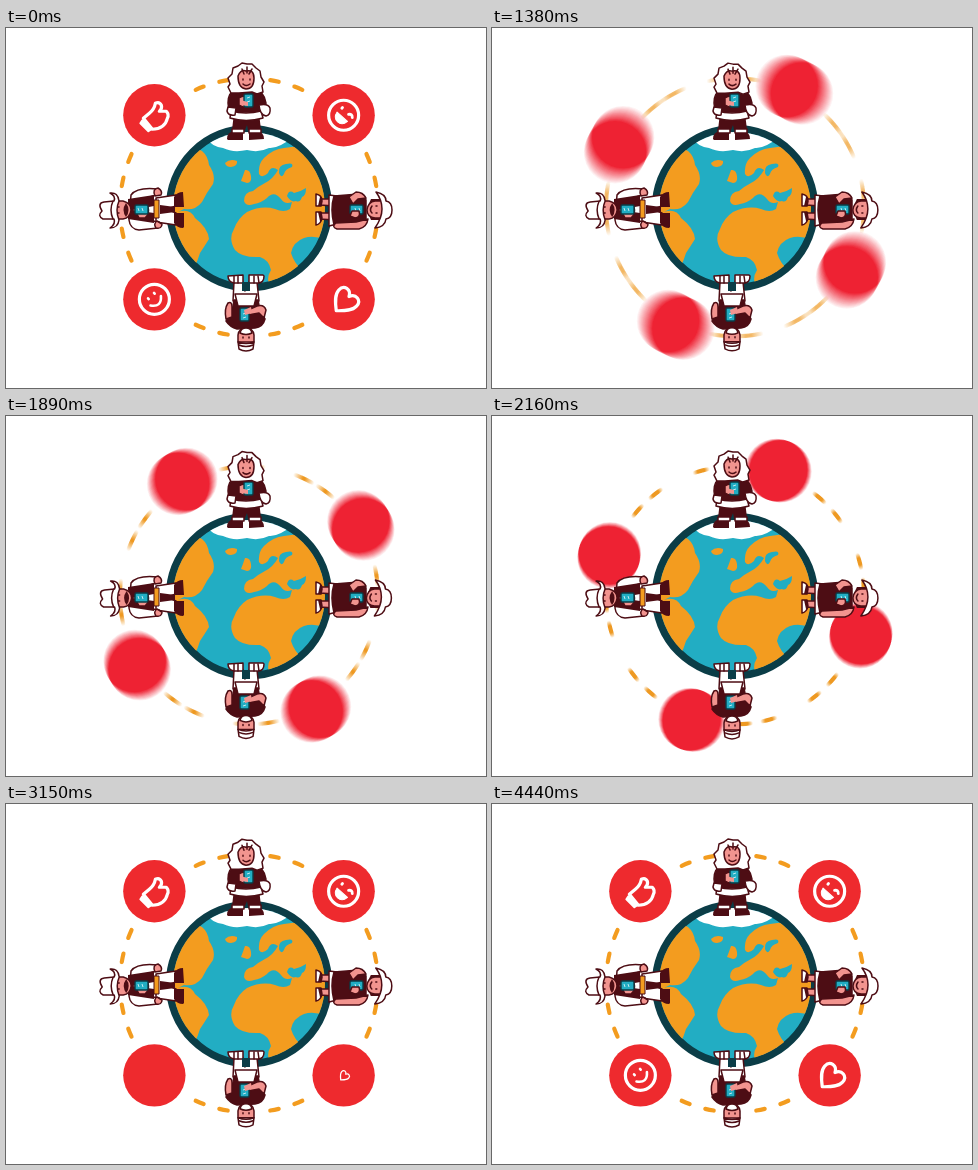
Recreate the animation shown at these times as an HTML page with a canvas. Size 480 by 360 pixels, loop 4500 ms.

```html
<!DOCTYPE html>
<html lang="en">
<head>
<meta charset="utf-8">
<title>Connected globe</title>
<style>
  html, body { margin: 0; width: 100%; height: 100%; overflow: hidden; background: #fff; }
  #stage { position: relative; width: 480px; height: 360px; overflow: hidden; }
  canvas, svg { position: absolute; left: 0; top: 0; width: 480px; height: 360px; }
  .ln { stroke: #4d0d14; stroke-width: 1.5; stroke-linejoin: round; stroke-linecap: round; }
  .w { fill: #fff; }
  .m { fill: #4d0d14; }
  .s { fill: #f2948f; }
  .n { fill: none; }
  .icon { fill: none; stroke: #fff; stroke-width: 3.2; stroke-linecap: round; stroke-linejoin: round; }
  .solid { fill: #fff; }
</style>
</head>
<body>
<div id="stage">
  <canvas id="dashes" width="480" height="360"></canvas>
  <canvas id="discs" width="480" height="360"></canvas>
  <svg viewBox="0 0 480 360">
    <defs>
      <clipPath id="sea"><circle cx="243" cy="180" r="76"/></clipPath>
      <g id="phone">
        <rect x="-4" y="-6" width="9" height="13" rx="1.5" fill="#22adc3" stroke="#0b3d47" stroke-width="1.4"/>
        <path d="M-1-2L2-3M-1 2L2 1" stroke="#bfeaf0" stroke-width="1"/>
      </g>
    </defs>

    <g id="icons">
      <g class="icon">
        <path d="M-11 3L-5-2Q0-6 1-12Q5-14 7-10Q8-7 5-4L12-4Q15-1 13 3Q12 8 8 11Q4 14-2 14Z"/>
        <path class="solid" d="M-12 5L-3 14L-6 16L-14 8Z" stroke-width="2"/>
      </g>
      <g class="icon">
        <circle r="15"/>
        <g transform="rotate(42)">
          <path class="solid" d="M-7 2H7Q6 9 0 9Q-6 9-7 2Z" stroke-width="1"/>
          <path d="M-6-5V-4M3-4Q5.500-7 8-4" stroke-width="2.800"/>
        </g>
      </g>
      <g class="icon">
        <path transform="translate(2 1) rotate(42)" d="M0 14C-7 8-12 3-12-3C-12-11-3-12 0-5C3-12 12-11 12-3C12 3 7 8 0 14Z"/>
      </g>
      <g class="icon">
        <circle r="15"/>
        <g transform="rotate(-42)" stroke-width="2.600">
          <path d="M-7 2Q0 11 7 2M-4-5V-4M4-5V-4"/>
        </g>
      </g>
    </g>

    <circle cx="243" cy="180" r="79.500" fill="#22adc3" stroke="#0b3d47" stroke-width="7.500"/>
    <g clip-path="url(#sea)" fill="#f39c1f">
      <path d="M160 145L176 128Q190 119 196 123Q202 128 203 137Q210 147 207 156Q201 164 196 174Q189 183 178 181L172 184Q184 180 189 190Q202 200 203 211Q198 219 194 225Q192 232 188 240L160 220Z"/>
      <path d="M219 135Q224 130 231 133Q232 138 225 139Q220 139 219 135Z"/>
      <path d="M235 153Q237 148 239 142Q244 141 245 148Q246 155 241 155Z"/>
      <path d="M253 146Q252 136 258 130Q267 121 278 120L293 118L325 150V214Q309 206 298 210Q287 214 285 225Q288 235 297 243L268 264Q258 253 265 242Q263 232 254 229Q236 230 229 222Q222 211 228 201Q232 190 241 184Q256 177 269 181Q278 185 284 181L286 174Q279 177 275 171Q268 162 261 170Q255 175 248 176Q240 179 238 173Q238 164 247 163Q253 158 259 155Q267 151 272 142Q265 137 262 145Q256 151 253 146Z"/>
    </g>
    <g clip-path="url(#sea)">
      <path fill="#22adc3" d="M273 145Q272 137 280 136Q288 134 286 139Q279 141 278 146Q275 151 273 145ZM281 168Q283 161 288 165Q294 164 300 160Q300 168 296 169Q294 175 290 173Q285 175 281 168Z"/>
      <path class="w" d="M198 108Q206 119 217 120Q227 125 241 122Q253 125 263 120Q272 121 289 108L260 96H220Z"/>
    </g>

    <!-- fur coat -->
    <g transform="translate(240 111)">
      <path class="m" d="M-12-26H13L15-9H2L1-14L-1-9H-14Z"/>
      <path class="m" d="M-19 0Q-19-7-12-8H-3V1H-18ZM3 1V-8H11Q18-7 18 0Z"/>
      <path class="w ln" d="M-14-10H-2V-6H-14ZM3-10H15V-6H3Z"/>
      <path class="m ln" d="M-10-49Q-18-47-18-36L-17-27H18L20-36Q18-48 9-49Z"/>
      <path class="w ln" d="M-15-28Q0-24 15-28L17-21Q0-16-16-21Z"/>
      <path class="w ln" d="M13-34Q22-36 24-31Q25-24 20-23Q14-24 13-34ZM-18-32L-10-31L-11-24Q-18-23-19-28Z"/>
      <path class="s ln" stroke-width="1" d="M-7-41Q-1-45 3-41L5-33Q-1-30-7-34Z"/>
      <use href="#phone" x="2" y="-39"/>
      <path class="s" d="M-6-39L2-37V-33L-5-34Z"/>
      <g class="head">
        <path class="w ln" d="M-15-46L-18-52L-16-55L-18-61L-14-65L-13-71L-8-73L-4-76L1-75L6-75L10-71L14-68L15-62L18-57L16-53L17-47L11-45L6-47L-7-46Z"/>
        <path class="s ln" d="M-8-63Q-5-70 0-68Q8-70 8-61Q8-50 0-50Q-8-51-8-63Z"/>
        <path class="ln n" d="M-4-70L-2-65M1-72V-66M6-70L3-65M-3-55Q0-52 4-55"/>
        <path class="eyes ln n" d="M-3-60V-59M4-60V-59"/>
      </g>
    </g>

    <!-- wide brim -->
    <g transform="translate(177 182) rotate(-90)">
      <path class="w ln" d="M-12-27H12L15-7H4L1-17L-3-7H-15Z"/>
      <path class="m" d="M-18 0Q-18-6-13-9H-3V1H-17ZM3 1V-9H13Q18-6 18 0Z"/>
      <path class="m" d="M-4-23H5L3-8H-2Z"/>
      <path class="w ln" d="M-10-54Q-19-53-20-44L-18-25L-12-24L-10-36L12-36L16-24L21-26Q23-46 15-52Z"/>
      <path class="m" d="M-9-55L-13-29H-3L0-50L4-29H15L11-55Z"/>
      <path d="M-8-29H10V-24H-8Z" fill="#f39c1f" stroke="#4d0d14"/>
      <path class="s ln" d="M-18-27Q-14-30-11-26L-14-21Q-19-21-18-27ZM14-28Q21-31 22-25Q19-20 15-22ZM-8-44Q-1-49 4-44L3-35Q-4-33-8-38Z"/>
      <use href="#phone" x="0" y="-42"/>
      <g class="head">
        <path class="s ln" d="M-9-68H9V-60Q7-52 0-52Q-8-53-9-60Z"/>
        <path class="m" d="M-7-57Q0-62 7-57Q0-52-7-57Z"/>
        <path id="wink" class="eyes ln n" d="M-3-65V-64M3-65V-64"/>
        <path class="w ln" d="M-18-73Q-14-67-9-69L-9-80Q-6-86-1-81Q7-86 8-79L9-69Q14-67 17-73Q18-65 9-64Q0-68-10-64Q-18-65-18-73Z"/>
        <path class="ln n" d="M-9-70Q0-74 9-70"/>
      </g>
    </g>

    <!-- sun hat -->
    <g transform="translate(311 181) rotate(90)">
      <path class="s ln" d="M-10-19H-3L-4-2H-10ZM4-19H11L10-2H4Z"/>
      <path class="w ln" d="M-15 1Q-14-5-8-5L-3-4V1ZM3 1V-4L9-5Q15-4 16 1Z"/>
      <path class="m" d="M-3-1V-5H-12V-3ZM3-1V-5H12V-3Z"/>
      <path class="w ln" d="M-13-20H15L17-12H-14Z"/>
      <path class="m ln" d="M-9-49Q-15-48-15-42L-13-17Q0-13 16-17L13-49Z"/>
      <path class="s ln" d="M10-51Q18-50 20-42L20-20Q18-14 14-19L13-39ZM-11-49Q-17-46-17-39L-12-32L-5-36L-10-41Z"/>
      <use href="#phone" x="0" y="-40"/>
      <path class="s ln" d="M2-42Q8-44 9-38L7-33L2-35Z"/>
      <g class="head">
        <path class="m" d="M-10-69H11V-54Q0-48-10-54Z"/>
        <path class="s ln" d="M-8-66H9V-58Q8-50 1-50Q-7-51-8-58Z"/>
        <path class="ln n" d="M-3-55Q1-52 4-55"/>
        <path class="eyes ln n" d="M-3-60V-59M4-60V-59"/>
        <path class="w ln" d="M-17-59Q-15-69-8-69Q-7-75 1-75Q9-75 10-69Q18-68 19-58Q9-65 0-65Q-9-65-17-59Z"/>
      </g>
    </g>

    <!-- cap -->
    <g transform="translate(240 248) rotate(180)">
      <path class="w ln" d="M-13-25H13L12-6H3L1-15L-3-6H-11Z"/>
      <path class="w ln" d="M-18 0Q-18-7-12-7H-3V1H-17ZM3 1V-7H12Q18-6 18 0Z"/>
      <path class="ln n" d="M-13-7L-12 0M12-7L12 0M-8-7V0M8-7V0"/>
      <path d="M-4-15H4V-6H-4Z" fill="#0b3d47"/>
      <path class="m ln" d="M-9-52Q-17-51-19-43L-14-35L-12-24H12L14-36L20-45Q16-51 9-53Z"/>
      <path class="w ln" d="M-8-30H8L11-18H-11Z"/>
      <path class="s ln" d="M-18-42L-20-34Q-18-28-11-30L-2-34V-39L-13-37ZM14-41L20-43Q22-33 18-27Q14-25 14-31Z"/>
      <use href="#phone" x="1" y="-39"/>
      <path class="s" d="M-6-37L1-39L2-34L-5-31Z"/>
      <g class="head">
        <path class="s ln" d="M-8-66H8V-59Q7-52 0-52Q-7-52-8-59Z"/>
        <path class="w ln" d="M-6-57Q0-60 6-57Q5-52 0-52Q-5-52-6-57Z"/>
        <path class="eyes ln n" d="M-3-62V-61M3-62V-61"/>
        <path class="w ln" d="M-8-66L-7-73Q0-77 7-73L8-66Q0-69-8-66Z"/>
        <path class="ln n" d="M-7-69Q0-72 7-69"/>
      </g>
    </g>
  </svg>
</div>
<script>
const LOOP = 4500, CX = 243, CY = 179.3, ORBIT = 132, RING = 129, TAU = Math.PI * 2;
const SPIN = { start: 1027, span: 1622, x1: 0.33, x2: 0.28 };
const SHUTTER = 18, SAMPLES = 17;
const rad = deg => deg * Math.PI / 180;
const clamp = v => Math.max(0, Math.min(1, v));
const smooth = v => v * v * (3 - 2 * v);
const dashCtx = document.getElementById('dashes').getContext('2d');
const discCtx = document.getElementById('discs').getContext('2d');
const icons = [...document.getElementById('icons').children];
const heads = document.querySelectorAll('.head');
const wink = document.getElementById('wink');
const home = [-135.8, -44.2, 44.2, 135.8];

// Full turn along an eased curve, in degrees
function turn(t) {
  const x = clamp((t - SPIN.start) / SPIN.span);
  let lo = 0, hi = 1;
  for (let i = 0; i < 24; i++) {
    const s = (lo + hi) / 2, r = 1 - s;
    if (3 * s * r * r * SPIN.x1 + 3 * s * s * r * SPIN.x2 + s * s * s < x) lo = s; else hi = s;
  }
  return x >= 1 ? 360 : x <= 0 ? 0 : 360 * smooth(lo);
}

// Swell to a peak, then settle to the end value
function pop(p, from, to) {
  const peak = 1.45;
  return p < 0.5
    ? from + (peak - from) * smooth(p * 2)
    : peak + (to - peak) * smooth(p * 2 - 1);
}

function iconScale(t, i) {
  const out = (t - 510 - 120 * i) / 240, back = (t - 2710 - 200 * i) / 240;
  return back > 0 ? pop(clamp(back), 0, 1) : pop(clamp(out), 1, 0);
}

function drawDashes(ctx, angle) {
  ctx.beginPath();
  for (let q = 0; q < 4; q++) {
    for (const off of [-22.5, -11.4, 11.4, 22.5]) {
      const a = rad(angle + q * 90 + off), half = rad(1.9);
      ctx.moveTo(CX + RING * Math.cos(a - half), CY + RING * Math.sin(a - half));
      ctx.arc(CX, CY, RING, a - half, a + half);
    }
  }
  ctx.stroke();
}

function drawDiscs(ctx, angle) {
  for (const h of home) {
    const a = rad(h + angle);
    ctx.beginPath();
    ctx.arc(CX + ORBIT * Math.cos(a), CY + ORBIT * Math.sin(a), 31.2, 0, TAU);
    ctx.fill();
  }
}

// Average the layer over the open shutter
function smear(ctx, draw, t) {
  const a = turn(t - SHUTTER / 2), b = turn(t + SHUTTER / 2);
  const n = b - a < 0.05 ? 1 : SAMPLES;
  ctx.clearRect(0, 0, 480, 360);
  ctx.globalCompositeOperation = 'lighter';
  ctx.globalAlpha = 1 / n;
  for (let i = 0; i < n; i++) draw(ctx, a + (b - a) * (i + 0.5) / n);
}

function render(t) {
  smear(dashCtx, drawDashes, t);
  smear(discCtx, drawDiscs, t);
  const angle = turn(t);
  icons.forEach((icon, i) => {
    const a = rad(home[i] + angle), k = iconScale(t, i);
    icon.style.display = k < 0.01 ? 'none' : '';
    icon.setAttribute('transform',
      `translate(${CX + ORBIT * Math.cos(a)} ${CY + ORBIT * Math.sin(a)}) rotate(${angle}) scale(${k})`);
  });
  const bob = t < 4300 ? 0.6 * Math.sin(TAU * t / 1500) ** 2 : 0;
  heads.forEach(h => h.setAttribute('transform', `translate(0 ${bob})`));
  wink.setAttribute('d', t >= 4350 && t < 4440
    ? 'M-4-64.5H-2M2-64.5H4' : 'M-3-65V-64M3-65V-64');
}

dashCtx.strokeStyle = '#f39c1f';
dashCtx.lineWidth = 4.2;
dashCtx.lineCap = 'round';
discCtx.fillStyle = '#ee2a2e';

const begin = performance.now();
function frame() {
  render((performance.now() - begin) % LOOP);
  requestAnimationFrame(frame);
}
frame();
</script>
</body>
</html>
```
